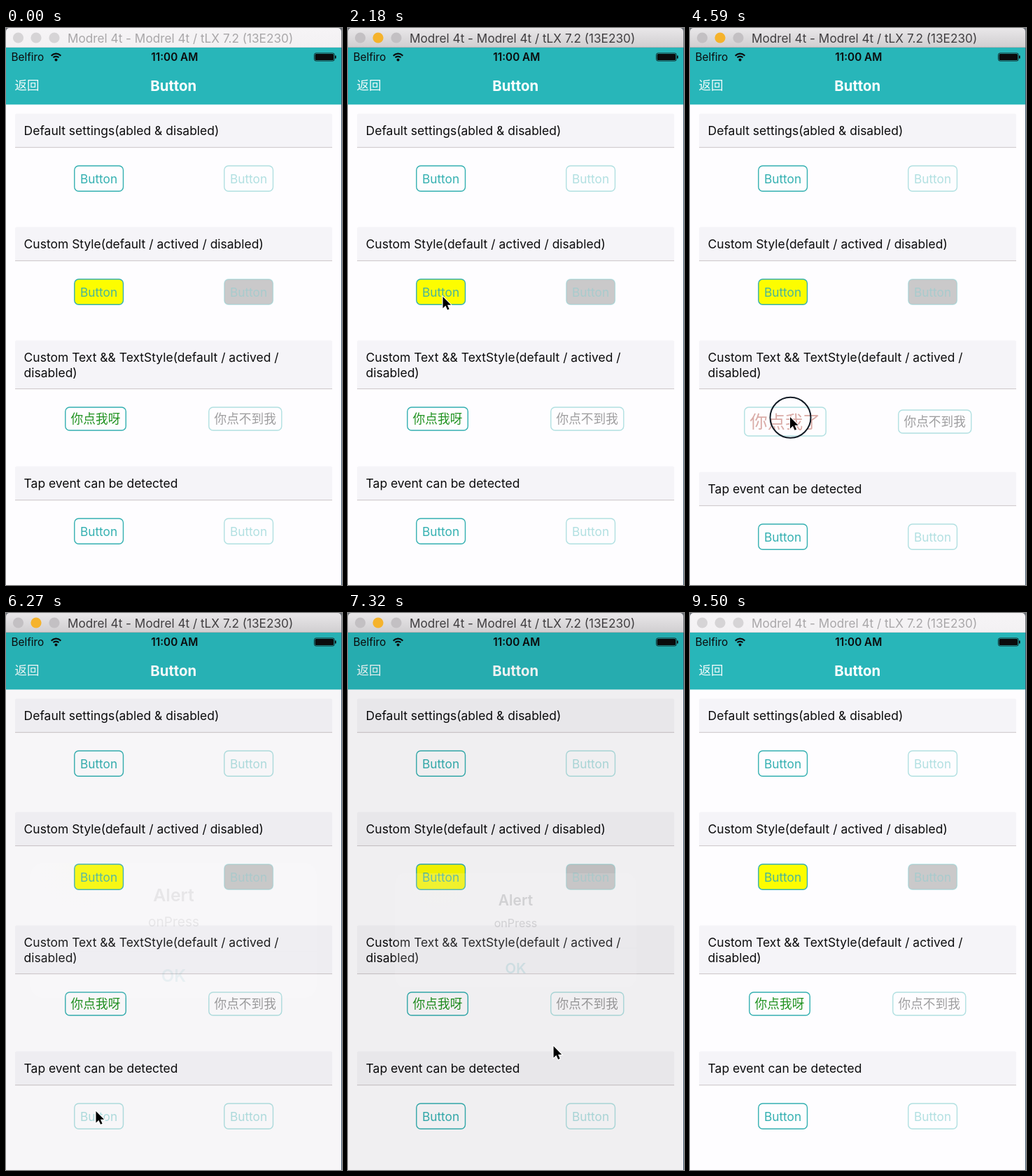
Animation of 480 by 796 pixels, one loop 9.55 s. Source, as an HTML page with a canvas:

```html
<!DOCTYPE html>
<html>
<head>
<meta charset="utf-8">
<style>
html, body { margin: 0; width: 100%; height: 100%; overflow: hidden; background: #fefdff; }
canvas { display: block; }
</style>
</head>
<body>
<canvas id="stage" width="480" height="796"></canvas>
<script>
const LOOP = 9550;
const ctx = document.getElementById('stage').getContext('2d');
const BAR = '#28b6b9', TEAL = '#34b0b1', INK = '#0b0b0c', FADED = 0.38;

// Pointer stops: time, x, y
const stops = [
  [250, 300, 830], [850, 134, 217], [1420, 134, 217], [1680, 342, 217], [1870, 342, 217],
  [2150, 135.5, 384], [2680, 135.5, 384], [3040, 342, 381], [3280, 342, 381],
  [3900, 143, 556], [4850, 143, 556], [5200, 340, 560], [5420, 340, 560],
  [5880, 128.5, 712], [6330, 128.5, 712], [6720, 244.5, 512], [7080, 244.5, 512], [7750, 411, 875]
];
// Clicks: start, end
const clicks = [
  [900, 1000], [1150, 1400], [1710, 1850], [2260, 2620], [3100, 3250],
  [4250, 4800], [5250, 5400], [5960, 6220], [6900, 7050]
];

const clamp = v => Math.max(0, Math.min(1, v));
const smooth = p => p * p * (3 - 2 * p);
const within = (t, a, b) => t >= a && t < b;

function text(str, x, midY, size, color, align = 'left', weight = 400) {
  ctx.font = `${weight} ${size}px Inter, "Noto Sans CJK SC", "Noto Sans CJK", sans-serif`;
  ctx.textAlign = align;
  ctx.fillStyle = color;
  ctx.fillText(str, x, midY + size * 0.364);
}

function rect(x, y, w, h, color) {
  ctx.fillStyle = color;
  ctx.fillRect(x, y, w, h);
}

function roundRect(x, y, w, h, r) {
  ctx.beginPath();
  ctx.roundRect(x, y, w, h, r);
}

function dot(x, y, r, color) {
  ctx.fillStyle = color;
  ctx.beginPath();
  ctx.arc(x, y, r, 0, 7);
  ctx.fill();
}

function titleBar(active) {
  const shade = ctx.createLinearGradient(0, 0, 0, 28);
  shade.addColorStop(0, active ? '#e9e7e9' : '#f6f4f6');
  shade.addColorStop(1, active ? '#d0ced0' : '#f3f1f3');
  rect(0, 0, 480, 28, '#6b7077');
  roundRect(0, 0, 479, 28, [5, 5, 0, 0]);
  ctx.fillStyle = shade;
  ctx.fill();
  rect(0, 27, 479, 1, active ? '#b4b2b4' : '#dcd9dc');
  [17.5, 43, 69].forEach((x, i) => {
    const color = active ? (i === 1 ? '#f5b32c' : '#c3c0c3') : '#d6d4d6';
    dot(x, 14, 7.6, color);
  });
  text('Modrel 4t - Modrel 4t / tLX 7.2 (13E230)', 88, 14.5, 17.2, active ? '#403e40' : '#a9a7a9');
}

function navBar() {
  rect(0, 28, 479, 81.4, BAR);
  text('Belfiro', 7.5, 41.5, 15.3, INK);
  text('11:00 AM', 240.8, 41.5, 15.3, INK, 'center', 600);
  dot(71.5, 45.4, 2, INK);
  ctx.strokeStyle = INK;
  ctx.lineWidth = 2.2;
  for (const r of [5.4, 9.3]) {
    ctx.beginPath();
    ctx.arc(71.5, 46, r, -Math.PI * 0.76, -Math.PI * 0.24);
    ctx.stroke();
  }
  ctx.lineWidth = 0.8;
  roundRect(440.4, 35.9, 28.8, 11.2, 2.5);
  ctx.stroke();
  roundRect(441.5, 37, 26.6, 9, 1.5);
  ctx.fillStyle = INK;
  ctx.fill();
  rect(470, 39.5, 1.6, 4, INK);
  text('返回', 12.5, 82, 17.5, '#f2fbfb');
  text('Button', 239.2, 82.3, 20.4, '#fff', 'center', 700);
}

function section(y, h, ...lines) {
  ctx.fillStyle = '#f5f4f8';
  roundRect(13, y, 453, h, 2);
  ctx.fill();
  rect(13, y + h - 1, 453, 1.2, '#d2cccf');
  lines.forEach((line, i) => text(line, 25.6, y + 23.8 + i * 22, 17.48, INK));
}

function button(x, y, w, h, { label = 'Button', color = TEAL, size = 17.3, fill, faded, edge = TEAL } = {}) {
  ctx.globalAlpha = faded ? FADED : 1;
  roundRect(x - 0.2, y, w, h, 6);
  if (fill) {
    ctx.fillStyle = fill;
    ctx.fill();
  }
  ctx.strokeStyle = edge;
  ctx.lineWidth = 1.4;
  ctx.stroke();
  text(label, x + w / 2 - 0.3, y + h / 2 + 0.2, size, color, 'center');
  ctx.globalAlpha = 1;
}

function page(t) {
  rect(0, 28, 479, 768, '#fefdff');
  rect(479, 28, 1, 768, '#40566c');
  navBar();

  section(122.5, 48.5, 'Default settings(abled & disabled)');
  button(98, 197, 69.7, 36.2, { faded: within(t, 1150, 1420) });
  button(312, 197, 69.7, 36.2, { faded: true });

  section(284.5, 48.5, 'Custom Style(default / actived / disabled)');
  button(98, 359, 69.7, 36.2, { fill: '#fdfd00', color: '#48b59a', faded: within(t, 2260, 2640) });
  button(312, 359, 69.7, 36.2, { fill: '#737373', color: '#70d0d2', edge: '#70d0d2', faded: true });

  section(446.5, 69.5, 'Custom Text && TextStyle(default / actived /', 'disabled)');
  const grown = within(t, 4250, 4820);
  if (grown) button(78, 542, 116.4, 41, { label: '你点我了', size: 25.2, color: '#a02818', faded: true });
  else button(85, 542, 86.5, 33, { label: '你点我呀', size: 17.7, color: '#1f921f' });
  button(grown ? 298 : 290, grown ? 546 : 542, 104, 33, { label: '你点不到我', size: 17.7, color: '#000', faded: true });

  const drop = grown ? 8 : 0;
  section(626.5 + drop, 48.5, 'Tap event can be detected');
  button(98, 701 + drop, 69.7, 36.2, { faded: within(t, 5960, 6340) });
  button(312, 701 + drop, 69.7, 36.2, { faded: true });
}

function alertBox(t) {
  const shown = 1 - (1 - clamp((t - 6257) / 400)) ** 2;
  const alpha = shown * (1 - clamp((t - 7067) / 400)) ** 2;
  if (!alpha) return;
  rect(0, 28, 479, 768, `rgba(0,0,0,${0.4 * alpha})`);
  ctx.save();
  ctx.globalAlpha = alpha;
  const scale = 1.2 - 0.2 * shown;
  ctx.translate(239.5, 453.5);
  ctx.scale(scale, scale);
  ctx.translate(-239.5, -453.5);
  roundRect(67, 372, 345, 163, 15);
  ctx.fillStyle = '#f6f6f8';
  ctx.fill();
  const glow = ctx.createRadialGradient(130, 374, 5, 130, 374, 58);
  glow.addColorStop(0, 'rgba(238,250,185,.85)');
  glow.addColorStop(1, 'rgba(246,246,248,0)');
  ctx.fillStyle = glow;
  ctx.fill();
  rect(67, 478.5, 345, 1, '#d9d9dc');
  text('Alert', 239.5, 410.5, 21, INK, 'center', 600);
  text('onPress', 239.5, 443, 16.1, INK, 'center');
  text('OK', 239.5, 508, 20.3, '#1a8f9b', 'center', 600);
  ctx.restore();
}

function pointer(t) {
  const next = stops.findIndex(stop => stop[0] > t);
  if (next < 1) return;
  const [t0, x0, y0] = stops[next - 1], [t1, x1, y1] = stops[next];
  const p = smooth((t - t0) / (t1 - t0));
  ctx.save();
  ctx.translate(x0 + (x1 - x0) * p, y0 + (y1 - y0) * p);
  if (clicks.some(([from, to]) => within(t, from, to))) {
    ctx.strokeStyle = '#111a24';
    ctx.lineWidth = 2;
    ctx.beginPath();
    ctx.arc(0.5, 0.8, 29, 0, 7);
    ctx.stroke();
  }
  ctx.scale(0.97, 0.97);
  const arrow = new Path2D('M0 0V17L4 13.2L6.8 19.4L9.4 18.3L6.7 12.2H12Z');
  ctx.strokeStyle = '#fff';
  ctx.lineWidth = 2.2;
  ctx.stroke(arrow);
  ctx.fillStyle = '#000';
  ctx.fill(arrow);
  ctx.restore();
}

function draw() {
  const t = performance.now() % LOOP;
  page(t);
  alertBox(t);
  titleBar(within(t, 950, 8600));
  pointer(t);
  requestAnimationFrame(draw);
}
draw();
</script>
</body>
</html>
```
